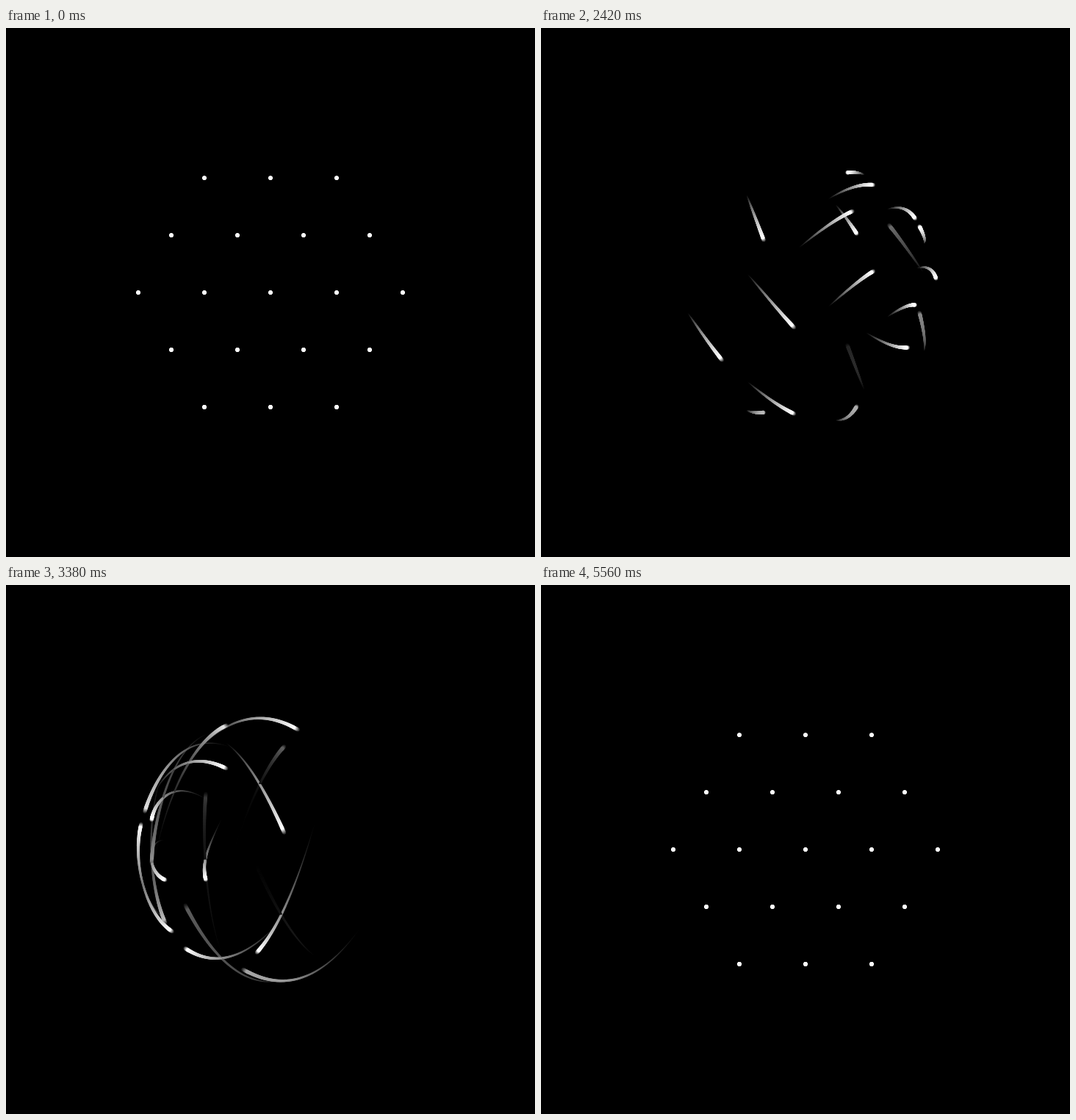
Write an HTML page with a canvas that moves like this. It is 720 px wide and 720 px high and loops after 6000 ms.

```html
<!DOCTYPE html>
<html lang="en">
<head>
<meta charset="utf-8">
<title>Turning sphere of dots</title>
<style>
html, body { margin: 0; width: 100%; height: 100%; overflow: hidden; background: #000; }
canvas { display: block; width: 720px; height: 720px; }
</style>
</head>
<body>
<canvas id="stage" width="720" height="720"></canvas>
<script>
const SIZE = 720, LOOP = 6000, STEP = 20;
const RADIUS = 180, GAP = 90;
const TAIL_MS = 240, TAIL_DOTS = 150, HEAD_R = 2.6, TIP_R = 0.4;
const SUBFRAMES = 5, SHUTTER_MS = 12;

const stage = document.getElementById('stage').getContext('2d');
const layer = document.createElement('canvas');
layer.width = layer.height = SIZE;
const ctx = layer.getContext('2d');

// Hexagonal lattice lifted onto a hemisphere; the inner ring tilts the other way.
const dots = [];
for (let row = -2; row <= 2; row++) {
  const count = 5 - Math.abs(row);
  for (let i = 0; i < count; i++) {
    const x = (i - (count - 1) / 2) * GAP;
    const y = row * GAP * Math.sqrt(3) / 2;
    const dist = Math.hypot(x, y);
    const z = Math.sqrt(Math.max(0, RADIUS * RADIUS - dist * dist));
    dots.push({ x, y, z, tilt: Math.abs(dist - GAP) < 1 ? -1 : 1 });
  }
}

function ease(p, power) {
  return p < 0.5
    ? 0.5 * Math.pow(2 * p, power)
    : 1 - 0.5 * Math.pow(2 * (1 - p), power);
}

function drawDots(ms, fade) {
  const p = Math.min(1, Math.max(0, ms / LOOP));
  const yaw = 2 * Math.PI * ease(p, 6);
  const pitch = 2 * Math.PI * ease(p, 7);
  const cy = Math.cos(yaw), sy = Math.sin(yaw);
  const cp = Math.cos(pitch), sp = Math.sin(pitch);
  const r = TIP_R + (HEAD_R - TIP_R) * fade;
  for (const d of dots) {
    const x = d.x * cy + d.z * sy;
    const depth = d.z * cy - d.x * sy;
    const y = d.y * cp + depth * sp * d.tilt;
    const z = depth * cp - d.y * sp * d.tilt;
    const grey = Math.round(255 * fade * (1 + Math.min(0, z) / RADIUS));
    ctx.fillStyle = `rgb(${grey},${grey},${grey})`;
    ctx.beginPath();
    ctx.arc(SIZE / 2 + x, SIZE / 2 + y, r, 0, 2 * Math.PI);
    ctx.fill();
  }
}

function drawLayer(ms) {
  ctx.fillStyle = '#000';
  ctx.fillRect(0, 0, SIZE, SIZE);
  for (let k = TAIL_DOTS - 1; k >= 0; k--) {
    const age = k / TAIL_DOTS;
    drawDots(ms - age * TAIL_MS, 1 - age);
  }
}

// Average several moments for motion blur.
function render(ms) {
  for (let s = 0; s < SUBFRAMES; s++) {
    drawLayer(ms + s * SHUTTER_MS / SUBFRAMES);
    stage.globalAlpha = 1 / (s + 1);
    stage.drawImage(layer, 0, 0);
  }
}

const start = performance.now();
let shown = -1;
function tick() {
  const elapsed = (performance.now() - start) % LOOP;
  const ms = Math.floor(elapsed / STEP) * STEP;
  if (ms !== shown) {
    shown = ms;
    render(ms);
  }
  requestAnimationFrame(tick);
}
tick();
</script>
</body>
</html>
```
